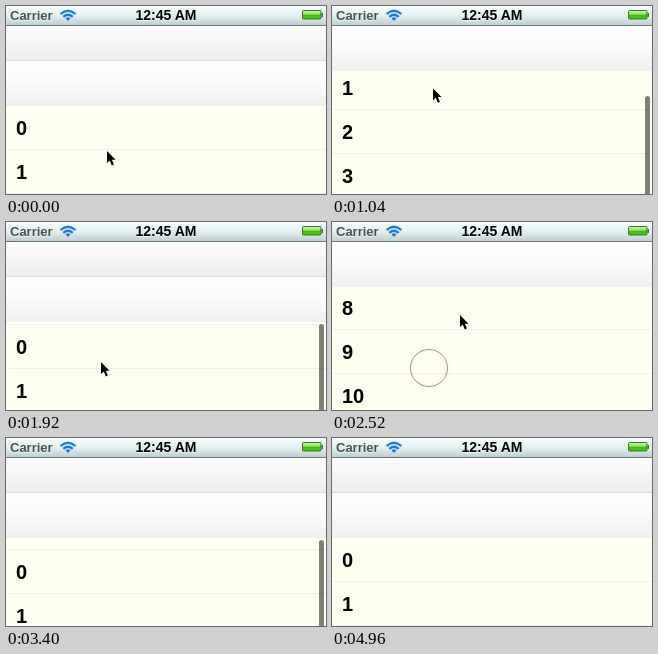
Animation, 320 px wide and 188 px high, one loop 5.48 s. Source, as an HTML page:

```html
<!DOCTYPE html>
<html lang="en">
<head>
<meta charset="utf-8">
<title>Table with pinned header</title>
<style>
  html, body { margin: 0; width: 100%; height: 100%; overflow: hidden; background: #fffff2; }
  svg { display: block; width: 320px; height: 188px; font-family: "Liberation Sans", Arial, sans-serif; font-weight: bold; }
</style>
</head>
<body>
<svg viewBox="0 0 320 188">
  <defs>
    <linearGradient id="statusFill" x2="0" y2="1">
      <stop offset="0" stop-color="#f8ffff"/>
      <stop offset=".5" stop-color="#e2eeef"/>
      <stop offset="1" stop-color="#bccbcd"/>
    </linearGradient>
    <linearGradient id="headFill" x2="0" y2="1">
      <stop offset="0" stop-color="#fdfdfd"/>
      <stop offset=".4" stop-color="#f8f8f8"/>
      <stop offset="1" stop-color="#ececec"/>
    </linearGradient>
    <linearGradient id="paneFill" x2="0" y2="1">
      <stop offset="0" stop-color="#ffffff"/>
      <stop offset=".4" stop-color="#fcfcfc"/>
      <stop offset="1" stop-color="#f0f0f0"/>
    </linearGradient>
    <linearGradient id="chargeFill" x2="0" y2="1">
      <stop offset="0" stop-color="#d6f5bd"/>
      <stop offset=".45" stop-color="#8fe055"/>
      <stop offset=".55" stop-color="#3fbe0c"/>
      <stop offset="1" stop-color="#46c814"/>
    </linearGradient>
  </defs>

  <rect width="320" height="188" fill="#fffff2"/>
  <g id="rows" font-size="20"></g>
  <g id="head">
    <rect y="20" width="320" height="35" fill="url(#headFill)"/>
    <rect y="54" width="320" height="1" fill="#dadada"/>
  </g>
  <rect id="pane" y="55" width="320" height="45" fill="url(#paneFill)"/>
  <rect id="bar" x="313" width="5" height="200" rx="2.5" fill="#000" fill-opacity=".5"/>

  <g>
    <rect width="320" height="20" fill="url(#statusFill)"/>
    <rect y="19" width="320" height="1" fill="#6c7a7e"/>
    <g fill="#fff" fill-opacity=".7">
      <text x="4" y="15" font-size="13">Carrier</text>
      <text x="160" y="15" font-size="14" text-anchor="middle">12:45 AM</text>
    </g>
    <text x="4" y="14" font-size="13" fill="#4b5153">Carrier</text>
    <text x="160" y="14" font-size="14" text-anchor="middle">12:45 AM</text>
    <g fill="none" stroke="#1f78dc" stroke-width="2.3">
      <path d="M54.6 8Q62 1.6 69.4 8"/>
      <path d="M57.3 10.8Q62 6.6 66.7 10.8"/>
      <path d="M59.6 12.4Q62 10.2 64.4 12.4L62 15Z" fill="#1f78dc" stroke="none"/>
    </g>
    <rect x="296.5" y="4.5" width="18.5" height="8.5" rx="1" fill="url(#chargeFill)" stroke="#3d7329"/>
    <rect x="315.5" y="7" width="1.5" height="4" fill="#3d7329"/>
  </g>

  <g id="ring" fill="none">
    <circle r="1" stroke="#fff2b4" stroke-opacity=".35" stroke-width="7" vector-effect="non-scaling-stroke"/>
    <circle r="1" stroke="#5a52c4" vector-effect="non-scaling-stroke"/>
  </g>
  <path id="arrow" d="M1 2V14L3.8 11.4L5.8 16.4L7.9 15.5L5.9 10.7H9.5Z" fill="#000" stroke="#fff" paint-order="stroke"/>
</svg>

<script>
const LOOP = 5480, STEP = 40, ROW = 44, COLLAPSE = 35, RING_LIFE = 260;
const $ = id => document.getElementById(id);
const clamp = (v, lo, hi) => Math.min(hi, Math.max(lo, v));
const mix = (a, b, u) => a + (b - a) * u;
const smooth = u => u * u * (3 - 2 * u);
const glide = u => 1 - (1 - u) ** 3;

// Each move goes on from where the one before it ended
const scrolls = [
  { from: 20, to: 800, end: 89, ease: glide },
  { from: 970, to: 1480, end: -6, ease: smooth },
  { from: 1880, to: 2700, end: 444, ease: smooth },
  { from: 2700, to: 3220, end: -45, ease: smooth },
  { from: 3220, to: 3720, end: 0, ease: glide }
];

const home = { x: 100, y: 143 };
const drags = [
  { from: 20, to: 400, x: 100, y: 77 },
  { from: 970, to: 1480, ...home },
  { from: 1880, to: 1920, x: 94, y: 138 },
  { from: 2280, to: 2460, x: 127, y: 91 },
  { from: 2760, to: 2920, x: 140, y: 245 }
];

const presses = [
  { at: 40, x: 101, y: 147 },
  { at: 560, x: 101, y: 81 },
  { at: 2280, x: 97, y: 146 },
  { at: 2780, x: 129, y: 96 }
];

function follow(moves, key, start, t) {
  return moves.reduce((v, m) => {
    const u = clamp((t - m.from) / (m.to - m.from), 0, 1);
    return mix(v, m[key], (m.ease || smooth)(u));
  }, start);
}

function set(el, attrs) {
  for (const k in attrs) el.setAttribute(k, attrs[k]);
  return el;
}

function make(tag, attrs, parent) {
  const el = document.createElementNS("http://www.w3.org/2000/svg", tag);
  return parent.appendChild(set(el, attrs));
}

const rows = Array.from({ length: 6 }, () => {
  const g = make("g", {}, $("rows"));
  make("rect", { y: 43, width: 320, height: 1, fill: "#f1f1f1" }, g);
  return { g, label: make("text", { x: 10, y: 29 }, g) };
});

function drawTable(t) {
  const s = Math.round(follow(scrolls, "end", 0, t));
  const lift = clamp(s, 0, COLLAPSE);
  const first = Math.floor(s / ROW) - 1;
  rows.forEach(({ g, label }, i) => {
    const n = first + i;
    set(g, {
      transform: `translate(0 ${100 + n * ROW - s})`,
      visibility: n < -1 ? "hidden" : "visible"
    });
    label.textContent = n < 0 ? "" : n;
  });
  set($("head"), { transform: `translate(0 ${-lift})` });
  set($("pane"), { y: 55 - lift });
  set($("bar"), {
    y: 102 - lift + Math.max(0, s - COLLAPSE) * 0.47,
    opacity: t < STEP ? 0 : clamp((4000 - t) / 200, 0, 1)
  });
}

function drawPointer(t) {
  const x = follow(drags, "x", home.x, t), y = follow(drags, "y", home.y, t);
  set($("arrow"), { transform: `translate(${x} ${y})` });

  const hit = presses.find(p => t >= p.at && t < p.at + RING_LIFE);
  set($("ring"), { visibility: hit ? "visible" : "hidden" });
  if (!hit) return;
  const age = (t - hit.at) / RING_LIFE;
  set($("ring"), {
    transform: `translate(${hit.x} ${hit.y}) scale(${mix(4.2, 19.7, age)})`,
    opacity: 1 - age * 0.35
  });
}

const start = performance.now();
function tick() {
  const elapsed = (performance.now() - start) % LOOP;
  const t = Math.floor(elapsed / STEP) * STEP;
  drawTable(t);
  drawPointer(t);
  requestAnimationFrame(tick);
}
tick();
</script>
</body>
</html>
```
